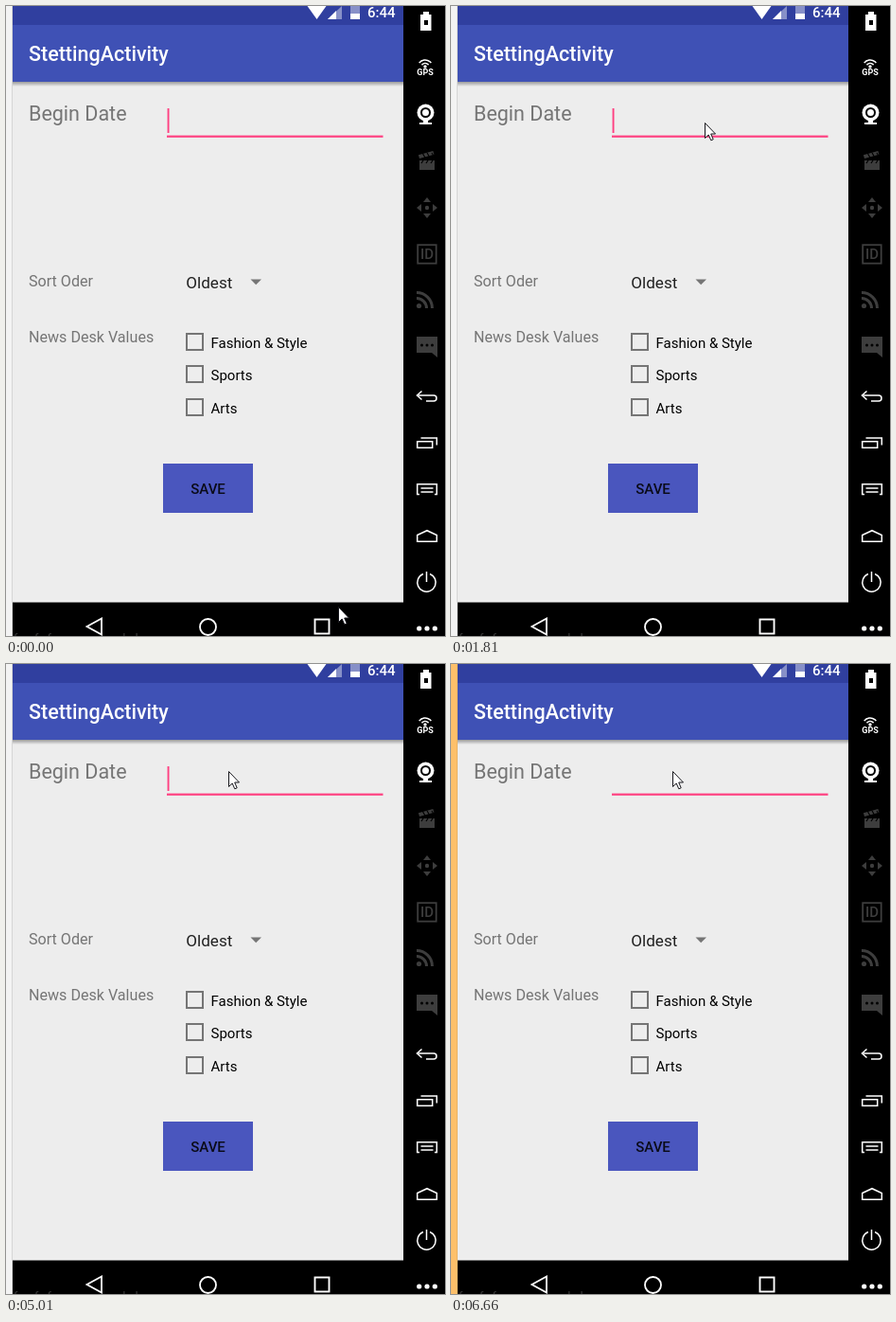
An HTML page with a canvas for the animation above (8 s loop, 464x665 px).

```html
<!DOCTYPE html>
<html lang="en">
<head>
<meta charset="utf-8">
<title>Settings screen</title>
<style>
html, body { margin: 0; width: 100%; height: 100%; overflow: hidden; background: #000; }
canvas { display: block; }
</style>
</head>
<body>
<canvas id="stage" width="464" height="665"></canvas>
<script>
const ctx = document.getElementById('stage').getContext('2d');
const LOOP = 8000;
const TICK = 138.7; // the screen refreshes in steps of this many ms
const GREY = '#757575', DIM = '#3d3d3d', WHITE = '#fff', BLACK = '#000', PINK = '#ff4081';

// Blinking and events, counted in ticks.
const FIRST_BLINK = 1.85, BLINK = 3.62, LAST_BLINK = 48, STRIP_TURNS = 41;

// Pointer moves: start tick, end tick, target.
const START = { x: 351, y: 634 };
const MOVES = [
  { from: 1, to: 4, x: 298, y: 282 },
  { from: 4, to: 6, x: 268, y: 123 },
  { from: 34, to: 37, x: 234, y: 113 }
];

const clamp = v => Math.min(1, Math.max(0, v));
const easeOut = p => 1 - (1 - p) ** 3;

function pointerAt(tick) {
  let { x, y } = START;
  for (const m of MOVES) {
    const p = easeOut(clamp((tick - m.from) / (m.to - m.from)));
    x += (m.x - x) * p;
    y += (m.y - y) * p;
  }
  return { x: Math.round(x), y: Math.round(y) };
}

function caretIsOn(tick) {
  if (tick >= LAST_BLINK) return false;
  const toggles = Math.min(12, Math.floor((tick - FIRST_BLINK) / BLINK) + 1);
  return toggles % 2 === 0;
}

function rect(x, y, w, h, color) {
  ctx.fillStyle = color;
  ctx.fillRect(x, y, w, h);
}

function frame(x, y, w, h, color, width) {
  ctx.strokeStyle = color;
  ctx.lineWidth = width;
  ctx.strokeRect(x, y, w, h);
}

function trace(points, closed) {
  ctx.beginPath();
  for (let i = 0; i < points.length; i += 2) ctx.lineTo(points[i], points[i + 1]);
  if (closed) ctx.closePath();
}

function poly(points, color) {
  trace(points, true);
  ctx.fillStyle = color;
  ctx.fill();
}

function line(points, color = WHITE, width = 1.5, closed = false) {
  trace(points, closed);
  ctx.strokeStyle = color;
  ctx.lineWidth = width;
  ctx.stroke();
}

function disc(x, y, r, color) {
  ctx.beginPath();
  ctx.arc(x, y, r, 0, Math.PI * 2);
  ctx.fillStyle = color;
  ctx.fill();
}

// Angles are given in half turns.
function arc(x, y, r, from, to, color = WHITE, width = 1.5) {
  ctx.beginPath();
  ctx.arc(x, y, r, from * Math.PI, to * Math.PI);
  ctx.strokeStyle = color;
  ctx.lineWidth = width;
  ctx.stroke();
}

function text(str, x, y, size, color, weight = 400, align = 'left') {
  ctx.font = `${weight} ${size}px Roboto, sans-serif`;
  ctx.textAlign = align;
  ctx.fillStyle = color;
  ctx.fillText(str, x, y);
}

function at(x, y, angle, paint) {
  ctx.save();
  ctx.translate(x, y);
  ctx.rotate(angle);
  paint();
  ctx.restore();
}

function statusBar() {
  rect(7, 0, 413, 20, '#303f9f');
  poly([318.5, 0, 338.5, 0, 328.5, 14], WHITE);
  poly([340, 14, 355, 14, 355, 0], '#8790c8');
  poly([340, 14, 349, 14, 349, 5], WHITE);
  rect(364, 0, 10, 8, '#8790c8');
  rect(364, 8, 10, 6, WHITE);
  text('6:44', 382, 12, 15, WHITE, 500);
}

function appBar() {
  rect(7, 20, 413, 60, '#3f51b5');
  const shadow = ctx.createLinearGradient(0, 80, 0, 85);
  shadow.addColorStop(0, 'rgba(0,0,0,.35)');
  shadow.addColorStop(1, 'rgba(0,0,0,0)');
  rect(7, 80, 413, 5, shadow);
  text('StettingActivity', 24, 58, 21.5, WHITE, 500);
}

function form(caretOn) {
  text('Begin Date', 24, 120.5, 21.5, GREY);
  rect(170, 136.6, 228.5, 2.2, PINK);
  if (caretOn) rect(170.6, 108, 1.9, 26, PINK);

  text('Sort Oder', 24, 296, 16.1, GREY);
  text('Oldest', 190.3, 298, 17.1, '#212121');
  poly([258.5, 288.5, 270, 288.5, 264.2, 294.3], GREY);

  text('News Desk Values', 24, 355, 16.1, GREY);
  ['Fashion & Style', 'Sports', 'Arts'].forEach((label, i) => {
    const y = Math.round(354.7 + 34.5 * i);
    frame(191, y - 9, 17, 17, GREY, 2);
    text(label, 216.5, y + 6, 15, BLACK);
  });

  rect(166, 483, 95, 52, '#4a56be');
  text('SAVE', 213.5, 515, 15, '#0a0b18', 500, 'center');
}

function navBar() {
  rect(7, 629.5, 413, 36, BLACK);
  text('for  f   from   use  and  d', 8, 672, 12.5, '#3a3a3a');
  line([85.5, 655, 101, 646.5, 101, 663.5], WHITE, 1.8, true);
  arc(213.5, 655.5, 8.5, 0, 2, WHITE, 1.8);
  frame(326.5, 647.5, 15, 15, WHITE, 1.9);
}

// Side icons from top to bottom, each drawn around its own centre.
const icons = [
  function battery() {
    rect(-4, -10, 6, 3, WHITE);
    rect(-7, -7, 11.5, 17, WHITE);
    rect(-3, -1, 4, 5, BLACK);
  },
  function gps() {
    disc(-2, -1, 1.7, WHITE);
    for (const r of [4.5, 8]) arc(-2, 0, r, 1.21, 1.79);
    text('GPS', -2, 8, 9, WHITE, 700, 'center');
  },
  function camera() {
    disc(-1.5, -1.5, 9, WHITE);
    arc(-1.5, -1.5, 4.5, 0, 2, BLACK, 2);
    rect(-4, 7, 5, 3, WHITE);
    rect(-8, 9, 13, 2, WHITE);
  },
  function clapper() {
    rect(-8, 0, 16, 10, DIM);
    at(-8, -2, -0.27, () => rect(0, -4, 16, 4, DIM));
    for (let x = -4; x < 8; x += 5) {
      line([x, 0, x - 2, 3], BLACK, 1.2);
      line([x - 1, -8, x + 2, -3], BLACK, 1.2);
    }
  },
  function move() {
    disc(0, 0, 2.2, DIM);
    for (let i = 0; i < 4; i++) {
      at(0, 0, i * Math.PI / 2, () => poly([-4, -6, 4, -6, 0, -11], DIM));
    }
  },
  function id() {
    frame(-9.8, -9.8, 19.5, 19.5, DIM, 1.8);
    text('ID', 0, 5, 15, DIM, 500, 'center');
  },
  function feed() {
    disc(-8.5, 5.5, 2.6, DIM);
    for (const r of [10.5, 16.5]) arc(-11, 8, r, 1.5, 2, DIM, 3);
  },
  function chat() {
    rect(-11, -11, 22, 17, DIM);
    poly([5, 6, 11, 6, 11, 11], DIM);
    for (const x of [-5.5, 0, 5.5]) disc(x, -2, 1.5, BLACK);
  },
  function back() {
    line([-5.5, -3.5, -10.5, 1, -5.5, 5.5]);
    line([-10.5, 1, 7, 1]);
    arc(7, 4, 3, -0.5, 0.5);
    line([7, 7, -1, 7]);
  },
  function recent() {
    frame(-10.3, 0.7, 16, 6.6, WHITE, 1.5);
    line([-6.5, -3, 10.3, -3, 10.3, 4.5]);
  },
  function menu() {
    line([-8, 7.5, -10.3, 7.5, -10.3, -3.3, 10.3, -3.3, 10.3, 7.5, 8, 7.5]);
    for (const y of [1, 5]) line([-6.5, y, 6.5, y]);
  },
  function home() {
    line([-10.3, 1.5, 0, -3.3, 10.3, 1.5, 10.3, 8.3, -10.3, 8.3], WHITE, 1.5, true);
  },
  function power() {
    arc(-0.5, 1.5, 9.7, -0.38, 1.38);
    line([-0.5, -10, -0.5, 1]);
  },
  function more() {
    for (const x of [-8.3, 0, 8.3]) disc(x, 1, 2.6, WHITE);
  }
];

function sidePanel() {
  rect(420, 0, 44, 665, BLACK);
  icons.forEach((icon, i) => at(445, Math.floor(16 + 49.25 * i), 0, icon));
}

function pointer({ x, y }) {
  at(x + 0.5, y + 0.5, 0, () => {
    const shape = [0, 0, 0, 16, 3.7, 12.5, 6.3, 18.3, 8.7, 17.3, 6.2, 11.5, 11, 11.5];
    poly(shape, WHITE);
    line(shape, '#16161c', 1, true);
  });
}

function leftStrip(orange) {
  rect(0, 0, 7, 665, orange ? '#fdc06a' : '#f3f3f3');
  rect(6, 0, 1, 665, orange ? '#e8b468' : '#d6d6d6');
}

function draw(t) {
  const tick = Math.floor(t / TICK);
  rect(7, 0, 413, 665, '#ededed');
  leftStrip(tick >= STRIP_TURNS);
  statusBar();
  appBar();
  form(caretIsOn(tick));
  navBar();
  sidePanel();
  pointer(pointerAt(tick));
}

const start = performance.now();
function loop() {
  draw((performance.now() - start) % LOOP);
  requestAnimationFrame(loop);
}
loop();
</script>
</body>
</html>
```
